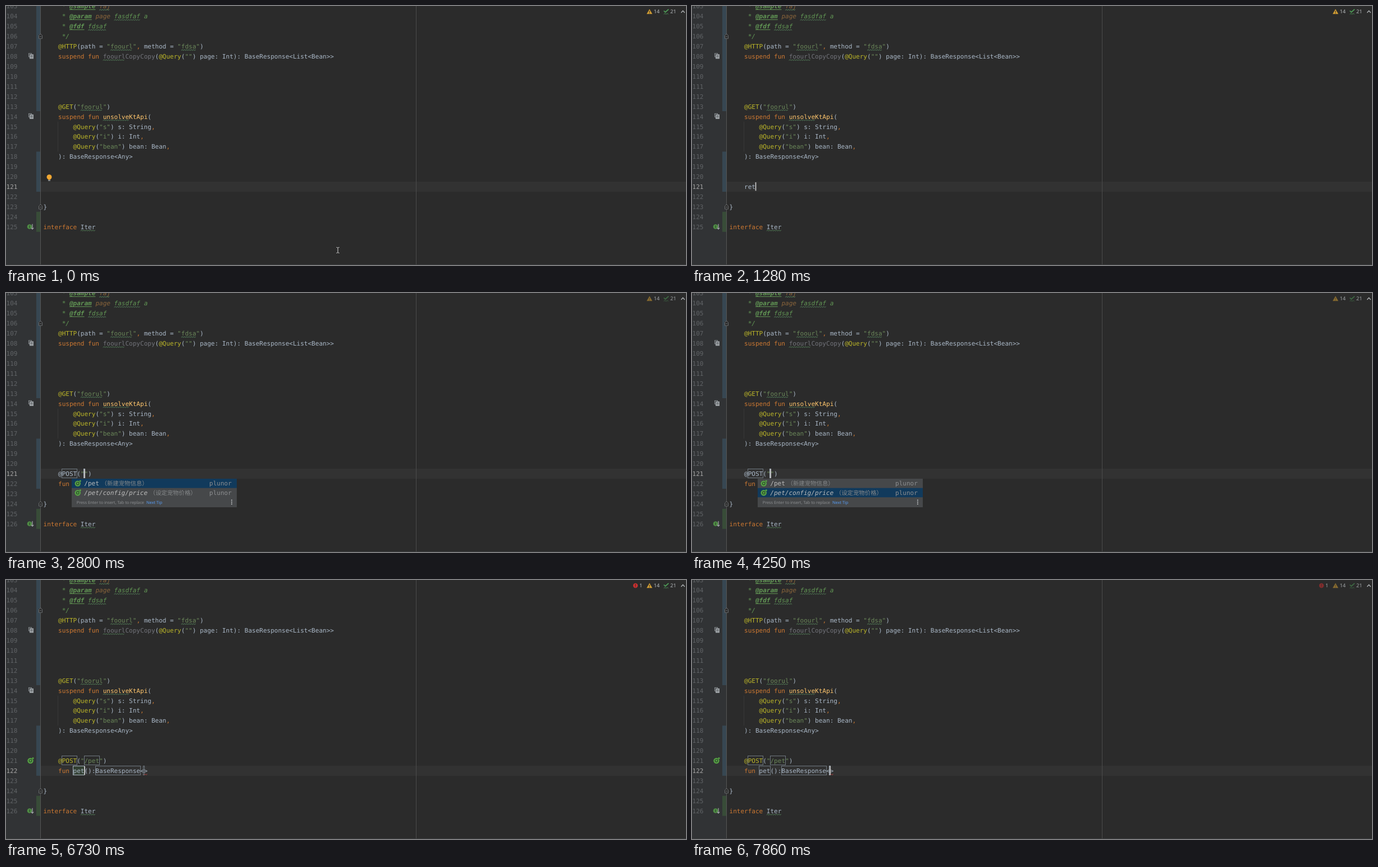
Recreate the animation shown at these times as an HTML page with a canvas. Size 1211 by 463 pixels, loop 8000 ms.

```html
<!DOCTYPE html>
<html lang="en">
<head>
<meta charset="utf-8">
<title>Code editor</title>
<style>
html, body { margin: 0; width: 100%; height: 100%; overflow: hidden; background: #2b2b2b; }
canvas { display: block; }
</style>
</head>
<body>
<canvas id="stage" width="1211" height="463"></canvas>
<script>
const ctx = document.getElementById('stage').getContext('2d');
const W = 1211, H = 463, LOOP = 8000;
const X0 = 66.5, CW = 6.635, LH = 17.93;
const MONO = '"DejaVu Sans Mono", monospace';
const SANS = '"Noto Sans", sans-serif';
const CJK = '"Noto Sans CJK SC", "Noto Sans CJK", sans-serif';
const CODE = '11.02px ' + MONO;
const COLORS = {
  k: '#cc7832', d: '#a9b7c6', a: '#bbb529', s: '#6a8759', f: '#ffc66d',
  c: '#629755', t: '#629755', v: '#8a653b', u: '#72737a'
};
const MARK = '#344134';

// Each token: colour key, optional ~ (typo) or _ (underline), then its text.
const TOP_ROWS = [
  [103, 5, 'c* ', 't_@sample', 'c ', 'v~faj'],
  [104, 5, 'c* ', 't_@param', 'c ', 'vpage', 'c ', 'c~fasdfaf', 'c a'],
  [105, 5, 'c* ', 't_@fdf', 'c ', 'c~fdsaf'],
  [106, 5, 'c*/'],
  [107, 4, 'a@HTTP', 'd(path = ', 's"', 's~foourl', 's"', 'k, ', 'dmethod = ', 's"', 's~fdsa', 's"', 'd)'],
  [108, 4, 'ksuspend fun ', 'u~foourl', 'uCopyCopy', 'd(', 'a@Query', 'd(', 's""', 'd) page: Int): BaseResponse<List<Bean>>'],
  [113, 4, 'a@GET', 'd(', 's"', 's~foorul', 's"', 'd)'],
  [114, 4, 'ksuspend fun ', 'f~unsolve', 'fKtApi', 'd('],
  [115, 8, 'a@Query', 'd(', 's"s"', 'd) s: String', 'k,'],
  [116, 8, 'a@Query', 'd(', 's"i"', 'd) i: Int', 'k,'],
  [117, 8, 'a@Query', 'd(', 's"bean"', 'd) bean: Bean', 'k,'],
  [118, 4, 'd): BaseResponse<Any>']
];
const VERBS = ['GET', 'POST', 'PUT', 'DELETE', 'HEAD', 'PATCH', 'OPTIONS'];
const PATHS = [['/pet', '（新建宠物信息）', ''], ['/pet/config/price', '（设定宠物价格）', 'italic ']];
const REPLACE_TIP = 'Press Enter or Tab to replace';
const INSERT_TIP = 'Press Enter to insert, Tab to replace';

const mid = n => 18.3 + (n - 104) * LH;
const colX = c => X0 + c * CW;

// Value of the last [time, value] pair already reached.
function at(t, ...steps) {
  let value = steps[0][1];
  for (const [time, v] of steps) if (t >= time) value = v;
  return value;
}

function rect(x, y, w, h, color) {
  ctx.fillStyle = color;
  ctx.fillRect(x, y, w, h);
}

function text(str, x, y, color, font = CODE) {
  ctx.font = font;
  ctx.fillStyle = color;
  ctx.fillText(str, x, y);
  return ctx.measureText(str).width;
}

function path(points, color, width = 1, close = false) {
  ctx.beginPath();
  for (let i = 0; i < points.length; i += 2) ctx.lineTo(points[i], points[i + 1]);
  if (close) ctx.closePath();
  ctx.strokeStyle = color;
  ctx.lineWidth = width;
  ctx.stroke();
}

function disc(x, y, r, color) {
  ctx.fillStyle = color;
  ctx.beginPath();
  ctx.arc(x, y, r, 0, Math.PI * 2);
  ctx.fill();
}

function wave(x, y, w, color) {
  const points = [];
  for (let i = 0; i * 2 <= w; i++) points.push(x + i * 2, y + (i % 2 ? -0.7 : 0.7));
  path(points, color, 0.9);
}

function row([line, col, ...tokens]) {
  const y = mid(line) + 4;
  for (const token of tokens) {
    const key = token[0], mark = '~_'.includes(token[1]) ? token[1] : '';
    const str = token.slice(mark ? 2 : 1), x = colX(col), w = str.length * CW;
    const style = key === 't' ? 'italic bold ' : 'cv'.includes(key) ? 'italic ' : '';
    text(str, x, y, COLORS[key], style + CODE);
    if (mark === '~') wave(x, y + 2.6, w, '#5a8a5f');
    if (mark === '_') rect(x, y + 1.6, w, 1, COLORS[key]);
    col += str.length;
  }
}

function mark(line, col, len, color) {
  rect(colX(col), mid(line) - 8.8, len * CW, 17, color);
}

function field(line, col, len, active) {
  const w = len ? len * CW : 2;
  ctx.strokeStyle = active ? '#a8b4c0' : '#6f7880';
  ctx.lineWidth = 1;
  ctx.strokeRect(Math.round(colX(col) - (len ? 0.5 : 1.2)) + 0.5, Math.round(mid(line) - 9) + 0.5, Math.round(w), 16);
}

function copyIcon(y) {
  ctx.lineWidth = 1;
  ctx.strokeStyle = '#8b9094';
  ctx.strokeRect(40.5, y - 4.5, 5, 6);
  rect(42, y - 3, 7, 8, '#9da2a6');
  rect(43.5, y - 1, 4, 1, '#55595c');
  rect(43.5, y + 1, 4, 1, '#55595c');
}

function foldIcon(y) {
  const p = [58.5, y + 4, 58.5, y - 1.5, 61.5, y - 4.5, 64.5, y - 1.5, 64.5, y + 4];
  rect(58, y - 3, 7, 7, '#2b2b2b');
  path(p, '#686b6d', 1, true);
  path([60, y + 0.5, 63, y + 0.5], '#686b6d');
}

function endpointIcon(x, y) {
  disc(x, y, 5.2, '#57a345');
  ctx.strokeStyle = '#29452a';
  ctx.lineWidth = 1.1;
  ctx.beginPath();
  ctx.arc(x, y, 2.3, 0, Math.PI * 2);
  ctx.stroke();
  path([x + 1.8, y - 1.8, x + 4.4, y - 4.4], '#29452a');
  disc(x + 4.5, y - 4.5, 1.6, '#57a345');
}

function childIcon(y) {
  disc(42, y - 0.3, 4.3, '#4f8c45');
  path([42, y - 2.5, 42, y + 2], '#263b25', 1.1);
  path([47, y - 5, 47, y + 4], '#b0b5b8', 1.1);
  path([44.8, y + 1.8, 47, y + 4.2, 49.2, y + 1.8], '#b0b5b8', 1.1);
}

function gutter(t, extra, current) {
  rect(0, 0, 61, H, '#313335');
  rect(54, 0, 7, 188, '#374752');
  rect(54, mid(118) - 9, 7, (4 + extra) * LH, '#374752');
  rect(54, mid(124 + extra) - 9, 7, LH * 2, '#384c38');
  rect(61, 0, 1, H, '#555555');
  for (let n = 103; n <= 125 + extra; n++) {
    text(String(n), 0.6, mid(n) + 4, n === current ? '#a4a3a3' : '#606366');
  }
  copyIcon(mid(108) - 0.7);
  copyIcon(mid(114) - 0.7);
  foldIcon(mid(106));
  foldIcon(mid(123 + extra));
  childIcon(mid(125 + extra));
  if (t >= 5650) endpointIcon(43.5, mid(121));
}

function status(t) {
  ctx.globalAlpha = at(t, [0, 1], [1710, 0.55], [6310, 1], [7260, 0.55]);
  if (t >= 5720) {
    disc(1121, 10, 4.2, '#c9302f');
    rect(1120.4, 7.3, 1.2, 3.4, '#2b2b2b');
    rect(1120.4, 11.6, 1.2, 1.2, '#2b2b2b');
  }
  ctx.fillStyle = '#d6a033';
  ctx.beginPath();
  ctx.moveTo(1146, 5.5);
  ctx.lineTo(1151, 14.3);
  ctx.lineTo(1141, 14.3);
  ctx.fill();
  rect(1145.4, 8.5, 1.2, 3, '#2b2b2b');
  rect(1145.4, 12.3, 1.2, 1.1, '#2b2b2b');
  path([1171.5, 8.5, 1174.2, 11, 1180, 5.8], '#4f9e58', 1.7);
  wave(1171.5, 14, 8, '#4f9e58');
  ctx.globalAlpha = Math.max(ctx.globalAlpha, 0.85);
  const font = '9.2px ' + SANS;
  if (t >= 5720) text('1', 1128, 13.4, '#b4b8bb', font);
  text('14', 1153.5, 13.4, '#b4b8bb', font);
  text('21', 1183, 13.4, '#b4b8bb', font);
  ctx.globalAlpha = 1;
  path([1202.3, 12, 1205.5, 8.5, 1208.7, 12], '#b4b8bb', 1.2);
}

// Suggestion list: item(i, y) draws one line of it.
function popup(x, y, w, count, picked, tip, item) {
  const RH = 16.6, foot = y + count * RH;
  rect(x, y, w, count * RH + 17.8, '#46484a');
  rect(x, y + picked * RH, w, RH, '#113a5c');
  for (let i = 0; i < count; i++) item(i, y + (i + 0.5) * RH + 3.9);
  const font = '7.26px ' + SANS;
  const tw = text(tip, x + 8.8, foot + 11.4, '#8d8f91', font);
  if (tip === INSERT_TIP) text('Next Tip', x + 8.8 + tw + 4, foot + 11.4, '#589df6', font);
  for (let i = -1; i < 2; i++) rect(x + w - 10, foot + 7.7 + i * 3.4, 1.8, 1.8, '#c0c3c5');
}

function popups(t) {
  const light = '#bbbbbb', y = 332, y2 = y + LH;
  if (t >= 740 && t < 1280) {
    popup(70.5, y, 373.5, 1, 0, INSERT_TIP, (i, by) => {
      text('ret', colX(4), by, light);
      text('ret'.slice(0, t < 900 ? 2 : 3), colX(4), by, '#6cb2f0');
    });
  }
  if (t >= 1370 && t < 2670) {
    popup(95, y, 186, 7, t < 2470 ? 0 : 1, REPLACE_TIP, (i, by) => text(VERBS[i], 98.8, by, light));
  }
  if (t >= 2800 && t < 5320) {
    popup(117, y, 294, 2, at(t, [0, 0], [4250, 1], [5050, 0]), INSERT_TIP, (i, by) => {
      const [url, note, style] = PATHS[i];
      endpointIcon(127.7, by - 3.6);
      text(url, 139.3, by, light, style + CODE);
      text(note, 139.3 + url.length * CW + 3.7, by, '#85888a', '10.4px ' + CJK);
      text('plunor', 362, by, '#8c8e90');
    });
  }
  if (t >= 6990 && t < 7790) {
    popup(155, y2, 186, 2, 0, REPLACE_TIP, (i, by) => text(['BaseResponse', 'Response'][i], 159, by, light));
  }
}

function template(t) {
  const verb = t < 2670 ? 'GET' : 'POST';
  const url = t < 5320 ? '' : '/pet';
  const name = 'pet'.slice(0, at(t, [0, 0], [6570, 1], [6650, 2], [6730, 3]));
  const urlCol = 7 + verb.length, respCol = 11 + name.length;
  const fields = [
    [121, 5, verb.length], [121, urlCol, url.length],
    [122, 8, name.length], [122, respCol, 12], [122, respCol + 13, 0]
  ];
  const active = at(t, [0, 0], [2740, 1], [5390, 2], [6990, 3], [7860, 4]);
  const [line, col, len] = fields[active];
  if (active === 0) mark(113, 5, 3, MARK);
  if (active === 2) mark(line, col, len, MARK);
  if (active === 3) {
    mark(108, 54, 12, MARK);
    mark(118, 7, 12, MARK);
  }
  if ((active === 0 && t < 2670) || active === 3) mark(line, col, len, '#214283');
  fields.forEach((f, i) => field(...f, i === active));
  const tint = t < 5650 ? 'd' : 'a';
  row([121, 4, tint + '@' + verb, 'd(', 's"' + url + '"', 'd)']);
  row([122, 4, 'kfun ', 'd' + name + '():BaseResponse<>']);
  if (t >= 5720) wave(colX(respCol + 13), mid(122) + 6.6, CW, '#bc3f3c');
  return [line, col + len];
}

function bulb() {
  disc(77, 305.8, 4.5, '#f0a732');
  rect(75, 309, 4, 1.6, '#f0a732');
  rect(75, 311.2, 4, 1.6, '#9a9da0');
}

function pointer() {
  path([588.5, 431.5, 590, 431.5, 591, 432.5, 592, 431.5, 593.5, 431.5], '#d5d5d5');
  path([591, 432, 591, 441], '#d5d5d5');
  path([588.5, 441.5, 590, 441.5, 591, 440.5, 592, 441.5, 593.5, 441.5], '#d5d5d5');
}

function draw(t) {
  const extra = t < 1370 ? 0 : 1, current = t < 5390 ? 121 : 122;
  rect(0, 0, W, H, '#2b2b2b');
  gutter(t, extra, current);
  rect(62, Math.round(mid(current) - 9), W - 62, 18, '#323232');
  rect(730, 0, 1, H, '#4b4b4b');
  rect(92, mid(115) - 9, 1, LH * 3, '#393939');

  let caret;
  if (extra) {
    caret = template(t);
  } else {
    const typed = 'ret'.slice(0, at(t, [0, 0], [600, 1], [670, 2], [900, 3]));
    row([121, 4, 'd' + typed]);
    caret = [121, 4 + typed.length];
  }
  TOP_ROWS.forEach(row);
  row([123 + extra, 0, 'd}']);
  row([125 + extra, 0, 'kinterface ', 'd~Iter']);

  const lit = at(t, [0, 0], [130, 1], [1980, 0], [2400, 1], [3330, 0], [3790, 1],
    [4850, 0], [5320, 1], [7520, 0], [7790, 1]);
  if (lit) rect(colX(caret[1]) - 0.3, mid(caret[0]) - 8, 1.7, 15.2, '#c8c8c8');

  rect(0, 462, W, 1, '#3a3c3d');
  popups(t);
  status(t);
  if (t < 280) bulb();
  if (t < 600) pointer();
}

ctx.textRendering = 'geometricPrecision';
const start = performance.now();
function tick() {
  draw((performance.now() - start) % LOOP);
  requestAnimationFrame(tick);
}
tick();
</script>
</body>
</html>
```
